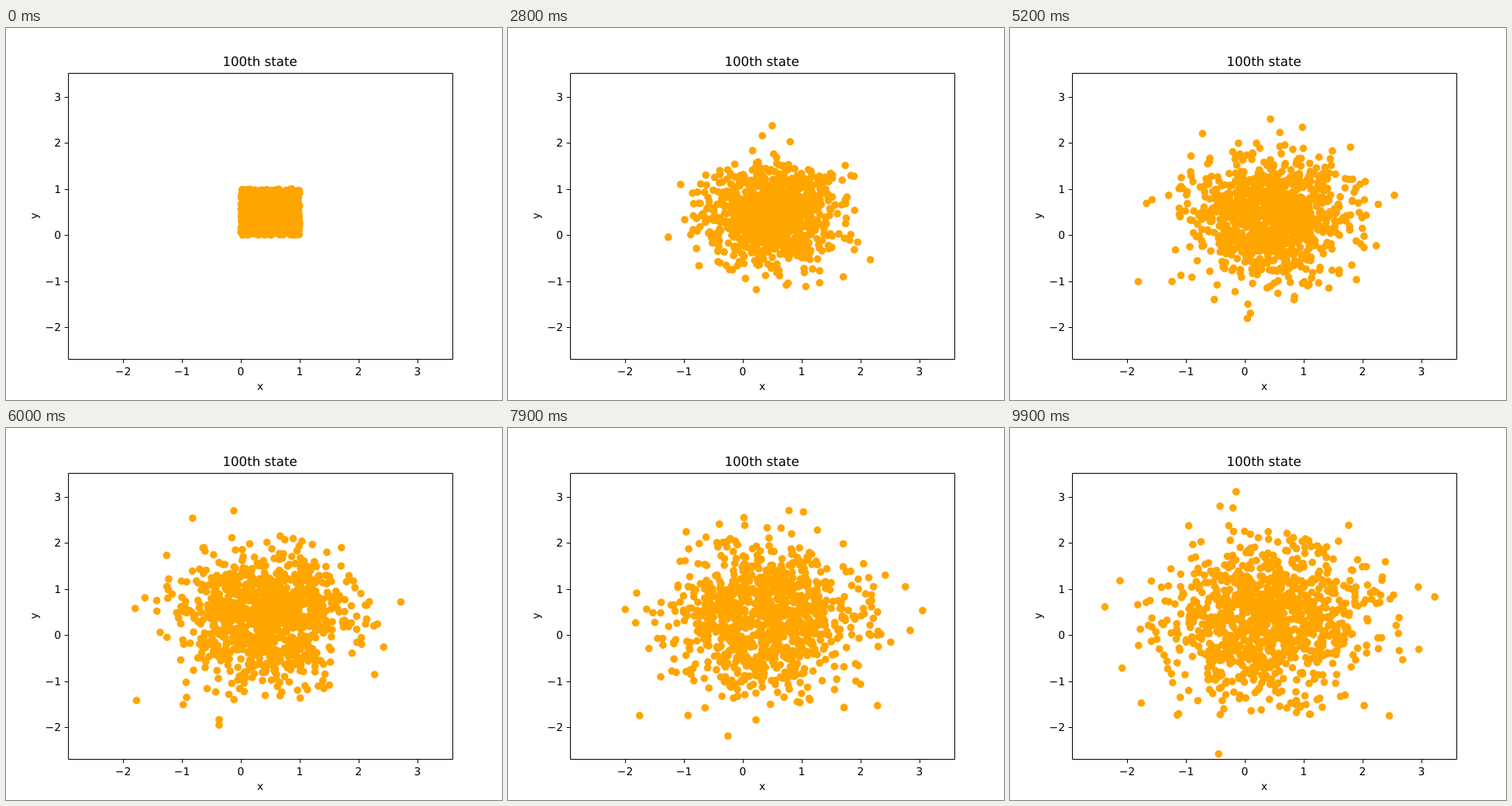
An HTML page with a canvas that plays this animation: 640x480 px, repeating every 10000 ms.

```html
<!DOCTYPE html>
<html lang="en">
<head>
<meta charset="utf-8">
<title>100th state</title>
<style>
  html, body { margin: 0; width: 100%; height: 100%; overflow: hidden; background: #fff; }
  canvas, svg { position: absolute; left: 0; top: 0; width: 640px; height: 480px; }
  text {
    font: 13.89px "DejaVu Sans", sans-serif;
    text-anchor: middle;
    text-rendering: geometricPrecision;
  }
  .title { font-size: 16.67px; }
  .right { text-anchor: end; }
  path { fill: none; stroke: #000; stroke-width: 1; }
</style>
</head>
<body>
<canvas id="cloud" width="640" height="480"></canvas>
<svg id="axes" viewBox="0 0 640 480">
  <path d="M80.5 58.5H576.5V427.5H80.5Z"/>
  <text class="title" x="327.6" y="49">100th state</text>
  <text x="328" y="467">x</text>
  <text transform="translate(41 242.5) rotate(-90)">y</text>
</svg>
<script>
const STATES = 100, STATE_MS = 100, COUNT = 1000;
const STEP = 0.081, DRIFT_X = -0.001, DRIFT_Y = -0.0018, RADIUS = 4.86;
const toX = x => 303 + 75.9 * x;
const toY = y => 267.3 - 59.45 * y;

let seed = 20117;
function random() {
  seed = (seed + 0x6D2B79F5) | 0;
  let r = Math.imul(seed ^ (seed >>> 15), 1 | seed);
  r = (r + Math.imul(r ^ (r >>> 7), 61 | r)) ^ r;
  return ((r ^ (r >>> 14)) >>> 0) / 4294967296;
}
const normal = () =>
  Math.sqrt(-2 * Math.log(1 - random())) * Math.cos(2 * Math.PI * random());

// Gaussian random walk from a random place in the unit square
function walk() {
  let x = random(), y = random();
  return Array.from({ length: STATES }, () => {
    const point = [toX(x), toY(y)];
    x += DRIFT_X + STEP * normal();
    y += DRIFT_Y + STEP * normal();
    return point;
  });
}
const walkers = Array.from({ length: COUNT }, walk);

function add(tag, attrs, content = "") {
  const el = document.createElementNS("http://www.w3.org/2000/svg", tag);
  for (const name in attrs) el.setAttribute(name, attrs[name]);
  el.textContent = content;
  document.getElementById("axes").append(el);
}

for (let n = -2; n <= 3; n++) {
  const label = String(n).replace("-", "\u2212");
  const x = Math.round(toX(n)), y = Math.round(toY(n));
  add("path", { d: `M${x + 0.5} 427.5v4.86` });
  add("path", { d: `M80.5 ${y + 0.5}h-4.86` });
  add("text", { x, y: 448 }, label);
  add("text", { x: 71, y: y + 5, class: "right" }, label);
}

const ctx = document.getElementById("cloud").getContext("2d");
ctx.fillStyle = "#ffa500";
let shown = -1;

function draw(state) {
  ctx.clearRect(0, 0, 640, 480);
  ctx.beginPath();
  for (const path of walkers) {
    const [x, y] = path[state];
    ctx.moveTo(x + RADIUS, y);
    ctx.arc(x, y, RADIUS, 0, 2 * Math.PI);
  }
  ctx.fill();
}

function tick() {
  const state = Math.floor(performance.now() / STATE_MS) % STATES;
  if (state !== shown) draw(shown = state);
  requestAnimationFrame(tick);
}
tick();
</script>
</body>
</html>
```
